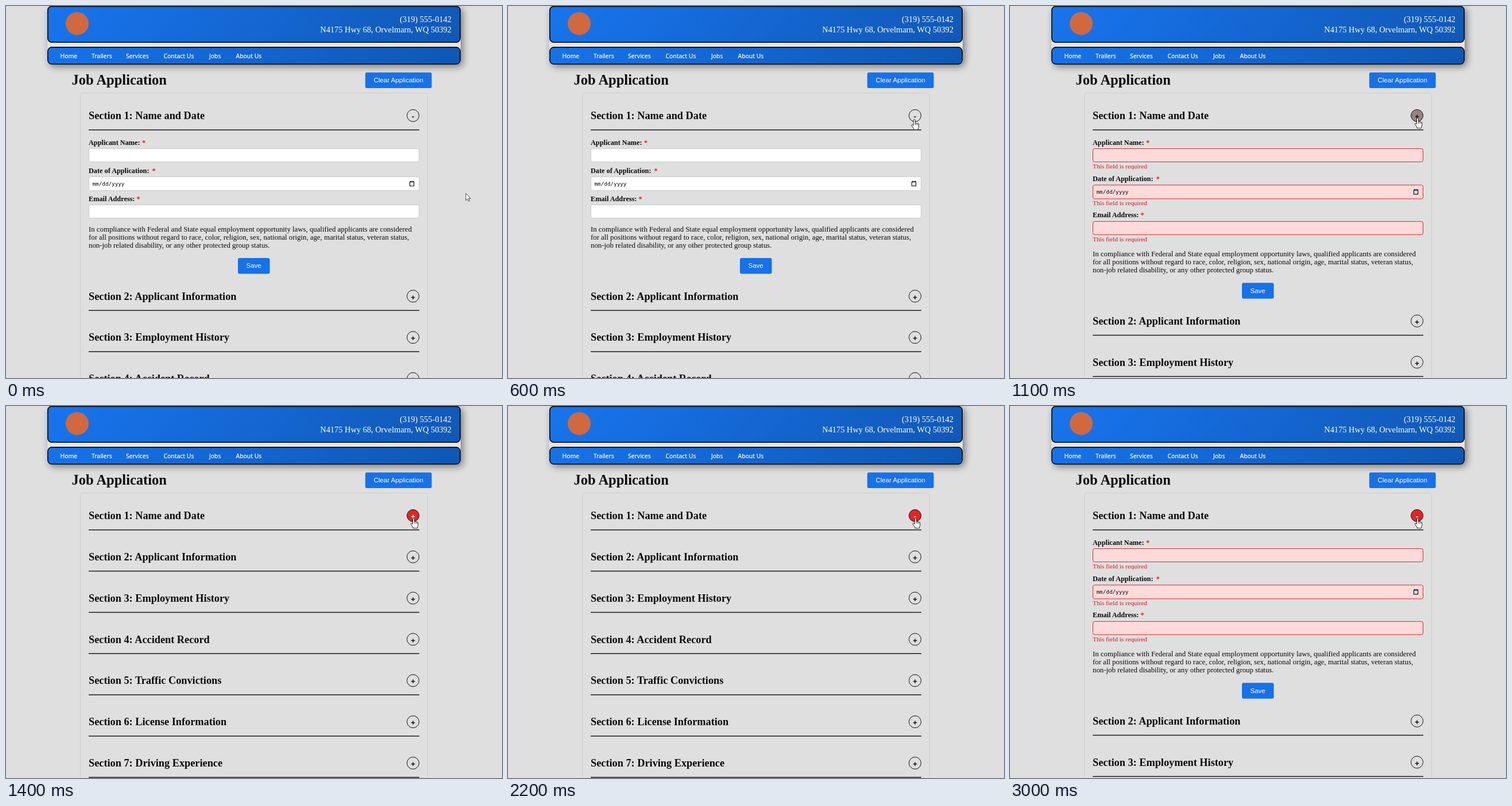
Recreate the animation shown at these times as an HTML page. Size 864 px wide and 648 px high, loop 3100 ms.

```html
<!DOCTYPE html>
<html lang="en">
<head>
<meta charset="utf-8">
<title>Job Application</title>
<style>
  html, body { margin: 0; width: 100%; height: 100%; overflow: hidden; background: #dfdfdf; }
  svg { display: block; width: 864px; height: 648px; }
  text { font-family: "Liberation Serif", "Times New Roman", serif; fill: #0a0a0a; white-space: pre; }
  .title { font-size: 24.5px; font-weight: 700; }
  .head { font-size: 18.3px; font-weight: 700; }
  .label { font-size: 12.25px; font-weight: 700; }
  .body { font-size: 12.8px; }
  .error { font-size: 11.36px; fill: #d31c1c; }
  .star { fill: #d8201c; }
  .contact { font-size: 14.4px; fill: #fff; text-anchor: end; }
  .nav { font: 500 10.4px "Noto Sans", "Open Sans", sans-serif; fill: #fff; stroke: #fff; stroke-width: .2; }
  .btn { font: 11.52px "Liberation Sans", Arial, sans-serif; fill: #fff; text-anchor: middle; }
  .sign { font: 700 13px "Liberation Sans", Arial, sans-serif; text-anchor: middle; }
  .date { font: 9.3px "DejaVu Sans Mono", "Liberation Mono", monospace; }
  .bar { fill: url(#blue); stroke: #05080c; stroke-width: 1.6; }
  .blue { fill: #1771e8; }
  .input { fill: #fff; stroke: #cbcbcb; }
  .invalid .input { fill: #ffdadb; stroke: #d52a2a; }
  .error { display: none; }
  .invalid .error { display: inline; }
</style>
</head>
<body>
<svg viewBox="0 0 864 648">
  <defs>
    <linearGradient id="blue" gradientUnits="userSpaceOnUse" x1="236" y1="-164" x2="628" y2="228">
      <stop stop-color="#1875ee"/>
      <stop offset="1" stop-color="#1058b6"/>
    </linearGradient>
    <filter id="shadow" filterUnits="userSpaceOnUse" x="30" y="-40" width="810" height="190">
      <feDropShadow dx="3.6" dy="3.6" stdDeviation="6.5" flood-color="#000" flood-opacity=".48"/>
    </filter>
  </defs>
  <rect width="864" height="648" fill="#dfdfdf"/>

  <rect x="72" width="720" height="102" rx="8" fill="#e4e4e4" filter="url(#shadow)"/>
  <rect class="bar" x="72.8" y=".6" width="718.4" height="62.6" rx="7"/>
  <rect class="bar" x="72.8" y="71.9" width="718.4" height="29.4" rx="7"/>
  <circle cx="124" cy="30.5" r="20" fill="#d0693f"/>
  <text class="contact" x="776" y="28">(319) 555-0142</text>
  <text class="contact" x="776" y="46">N4175 Hwy 68, Orvelmarn, WQ 50392</text>
  <g id="nav"></g>

  <text class="title" x="114.5" y="137">Job Application</text>
  <rect class="blue" x="625.8" y="115.8" width="115.8" height="27.3" rx="3"/>
  <text class="btn" x="683.7" y="133">Clear Application</text>
  <rect x="129.5" y="151.5" width="605" height="900" rx="5" fill="none" stroke="#cdcdcd"/>

  <g id="first"></g>
  <g id="form"></g>
  <g id="rest"></g>

  <g id="arrow">
    <path d="M0 0V12.2L2.8 9.6L4.7 13.8L6.6 13L4.7 8.9H8.6Z" fill="#fff" stroke="#222" stroke-width=".8"/>
  </g>
  <g id="hand">
    <path d="M-1.6 10V1.4a1.5 1.5 0 0 1 3 0V6.2q1-1.2 2.2 .5q1.2-.9 2.1 .5q1.8-.5 2 1.2V12q0 2-1.2 3.4V17.6H-1V16L-4.6 11q-.9-1.6 .5-2q1-.2 2.5 1.6Z"
          fill="#fff" stroke="#111" stroke-width=".9" stroke-linejoin="round"/>
    <path d="M1.4 6.2V9.6M3.6 6.7V9.8M5.7 7.3V10" stroke="#111" stroke-width=".7"/>
  </g>
</svg>
<script>
const LOOP = 3100, STEP = 100;
const VALIDATE = 1100, CLOSE = 1200, MINUS = 2200, REOPEN = 2300;
const PITCH = 71.85, FORM_H = 242.7, ERROR_H = 14.4;

const $ = id => document.getElementById(id);
const move = (el, x, y) => el.setAttribute("transform", `translate(${x} ${y})`);
const show = (el, on) => el.style.display = on ? "" : "none";

const section = (n, name) => `
  <g transform="translate(0 ${(n - 1) * PITCH})">
    <text class="head" x="144" y="197">Section ${n}: ${name}</text>
    <rect x="144" y="215" width="576" height="1.5" fill="#1c1c1c"/>
    <circle cx="709" cy="190.9" r="10.5" fill="none" stroke="#111"/>
    <text class="sign" x="709" y="197">+</text>
  </g>`;

const field = (label, starX, y, h, extra = "") => `
  <g class="part">
    <text class="label" x="144" y="${y - 6.5}">${label}</text>
    <text class="label star" x="${starX}" y="${y - 6.5}">*</text>
    <rect class="input" x="144.5" y="${y + .5}" width="575" height="${h - 1}" rx="3"/>
    ${extra}
    <text class="error" x="144" y="${y + h + 11}">This field is required</text>
  </g>`;

const picker = `
  <text class="date" x="150.5" y="313">mm/dd/yyyy</text>
  <path d="M703.5 306.5H710.5V313.5H703.5ZM703 306H711M705 304.5V306M709 304.5V306"
        fill="none" stroke="#111" stroke-width="1.2"/>`;

const notice = [
  "In compliance with Federal and State equal employment opportunity laws, qualified applicants are considered",
  "for all positions without regard to race, color, religion, sex, national origin, age, marital status, veteran status,",
  "non-job related disability, or any other protected group status."
];

$("nav").innerHTML = [["Home", 94.5], ["Trailers", 149], ["Services", 209], ["Contact Us", 274.5], ["Jobs", 354], ["About Us", 400.5]]
  .map(([name, x]) => `<text class="nav" x="${x}" y="91">${name}</text>`).join("");

$("first").innerHTML = section(1, "Name and Date");
$("rest").innerHTML = ["Applicant Information", "Employment History", "Accident Record",
  "Traffic Convictions", "License Information", "Driving Experience"]
  .map((name, i) => section(i + 2, name)).join("");

$("form").innerHTML =
  field("Applicant Name:", 237, 248, 24) +
  field("Date of Application:", 254.5, 297, 25, picker) +
  field("Email Address:", 227.5, 346, 24) +
  `<g class="part">
    ${notice.map((line, i) => `<text class="body" x="144" y="${392.5 + i * 14.4}">${line}</text>`).join("")}
    <rect class="blue" x="404" y="439" width="55.5" height="27.5" rx="3"/>
    <text class="btn" x="431.6" y="456.4">Save</text>
  </g>`;

const parts = document.querySelectorAll(".part");
const knob = document.querySelector("#first circle");
const sign = document.querySelector("#first .sign");

// time, x, y
const path = [[0, 801, 326.5], [600, 707.8, 197.8], [1000, 710.1, 195.2], [LOOP, 710.1, 195.2]];

function pointer(t) {
  const i = path.findIndex(p => t < p[0]);
  const [t0, x0, y0] = path[i - 1], [t1, x1, y1] = path[i];
  const u = (t - t0) / (t1 - t0), e = u * u * (3 - 2 * u);
  return [x0 + (x1 - x0) * e, y0 + (y1 - y0) * e];
}

function render(now) {
  const t = Math.floor(now % LOOP / STEP) * STEP;
  const invalid = t >= VALIDATE;
  const open = t < CLOSE || t >= REOPEN;
  const shift = invalid ? ERROR_H : 0;

  $("form").setAttribute("class", invalid ? "invalid" : "");
  show($("form"), open);
  parts.forEach((part, i) => move(part, 0, shift * i));
  move($("rest"), 0, open ? FORM_H + shift * 3 : 0);

  knob.setAttribute("fill", !invalid ? "none" : t < 1200 ? "#988281" : t < 1300 ? "#cf4442" : "#e52325");
  sign.textContent = invalid && t < MINUS ? "+" : "-";
  sign.style.fill = t < CLOSE ? "#0a0a0a" : "#fff";

  const [x, y] = pointer(t);
  const over = x < 720 && y < 217;
  show($("hand"), over);
  show($("arrow"), !over);
  move(over ? $("hand") : $("arrow"), x, y);
}

const start = performance.now();
function tick() {
  render(performance.now() - start);
  requestAnimationFrame(tick);
}
tick();
</script>
</body>
</html>
```
